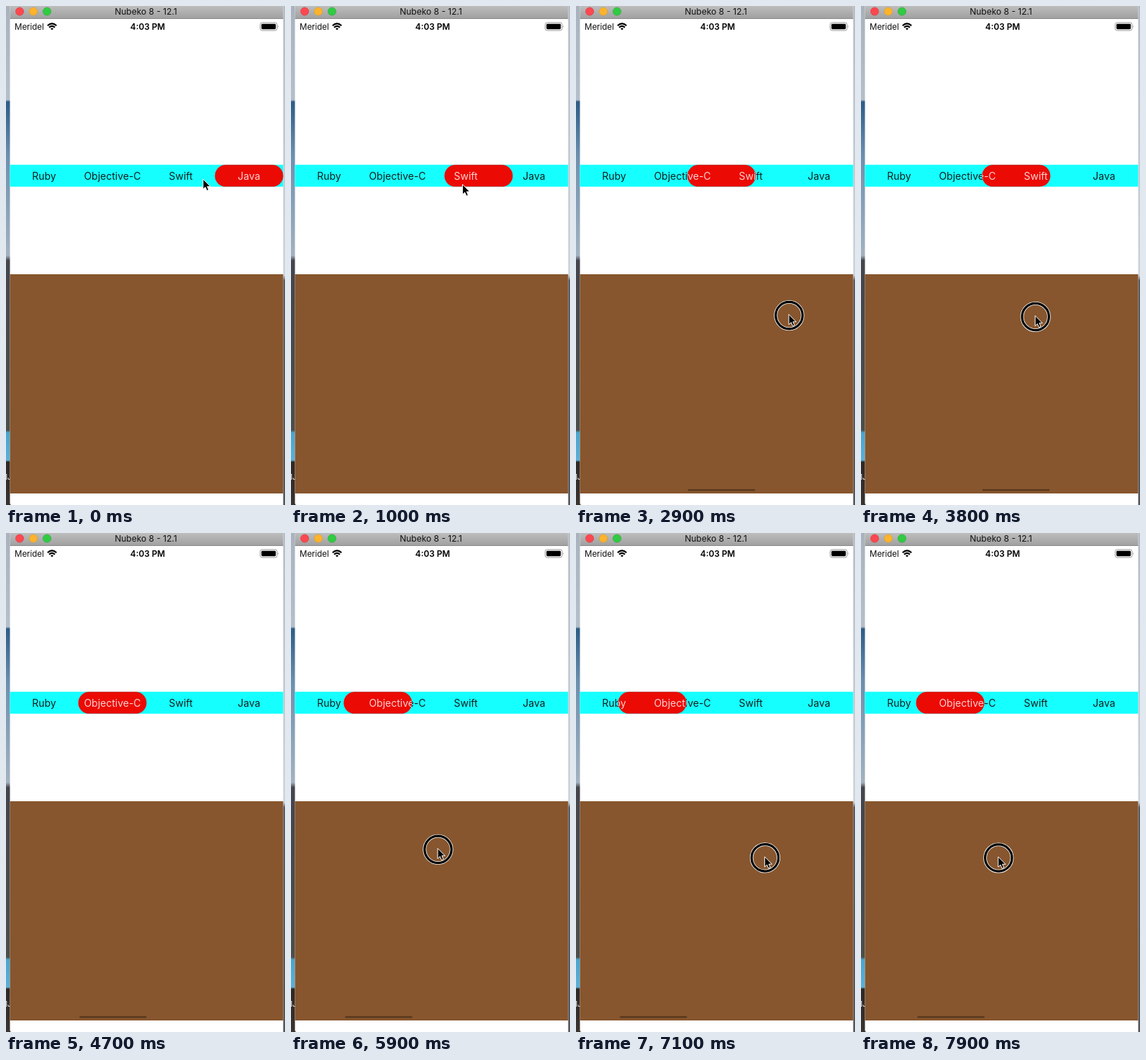
Animation of 388 by 692 pixels, one loop 8000 ms. Source, as an HTML page:

```html
<!DOCTYPE html>
<html lang="en">
<head>
<meta charset="utf-8">
<title>Segment pager</title>
<style>
  html, body { margin: 0; width: 100%; height: 100%; overflow: hidden; background: #fff; }
  svg { display: block; width: 388px; height: 692px; }
  text { font-family: Inter, Roboto, sans-serif; }
  .tabs { font-size: 14px; text-anchor: middle; }
</style>
</head>
<body>
<svg viewBox="0 0 388 692">
  <defs>
    <linearGradient id="desk" x1="0" y1="0" x2="0" y2="1">
      <stop offset="0" stop-color="#a9b2bd"/>
      <stop offset=".188" stop-color="#b4bfca"/>
      <stop offset=".192" stop-color="#2d5c85"/>
      <stop offset=".3" stop-color="#6d90ae"/>
      <stop offset=".5" stop-color="#a3b2c0"/>
      <stop offset=".51" stop-color="#45454d"/>
      <stop offset=".85" stop-color="#4c4f4b"/>
      <stop offset=".855" stop-color="#4aa5cf"/>
      <stop offset=".91" stop-color="#5bb0d8"/>
      <stop offset=".914" stop-color="#2d2927"/>
      <stop offset="1" stop-color="#3a3330"/>
    </linearGradient>
    <linearGradient id="edge" x1="0" y1="0" x2="0" y2="1">
      <stop offset="0" stop-color="#b5bcc5"/>
      <stop offset=".54" stop-color="#ccd3da"/>
      <stop offset=".55" stop-color="#5a5a62"/>
      <stop offset="1" stop-color="#55565a"/>
    </linearGradient>
    <linearGradient id="bar" x1="0" y1="0" x2="0" y2="1">
      <stop offset="0" stop-color="#bdbdbd"/>
      <stop offset="1" stop-color="#a0a0a0"/>
    </linearGradient>
    <clipPath id="clip"><rect id="hole" y="220.2" width="95" height="30.4" rx="15.2"/></clipPath>
  </defs>

  <rect width="388" height="692" fill="url(#edge)"/>
  <rect width="6" height="692" fill="url(#desk)"/>
  <text x="-2" y="657" font-size="10" fill="#eee">1J</text>
  <path d="M5.5 0H385.5V692H8Q5.5 692 5.5 689Z" fill="#fff"/>

  <rect x="5.5" width="380" height="17.5" fill="url(#bar)"/>
  <rect x="5.5" y="17" width="380" height="1" fill="#8c8c8c"/>
  <g stroke-width=".6">
    <circle cx="19" cy="7.5" r="5.6" fill="#fc4850" stroke="#d93a3e"/>
    <circle cx="38" cy="7.5" r="5.6" fill="#fdb32c" stroke="#d99a28"/>
    <circle cx="57" cy="7.5" r="5.6" fill="#30cb43" stroke="#27a935"/>
  </g>
  <text x="194.5" y="12" font-size="12" text-anchor="middle" fill="#111">Nubeko 8 - 12.1</text>

  <text x="12" y="33" font-size="11.5" fill="#111">Meridel</text>
  <g fill="none" stroke="#000" stroke-width="2.1">
    <path d="M57.8 27.3Q64 21.4 70.2 27.3M60 29.8Q64 26 68 29.8"/>
    <path d="M62 31.2Q64 29.6 66 31.2L64 33.4Z" fill="#000" stroke="none"/>
  </g>
  <text x="197" y="32.7" font-size="11.8" font-weight="600" text-anchor="middle">4:03 PM</text>
  <rect x="353.5" y="23" width="23.5" height="11" rx="2.8" fill="none" stroke="#999"/>
  <rect x="355.2" y="24.8" width="20" height="7.4" rx="1.4"/>
  <path d="M378.2 26.7q1.8 1.8 0 3.6z" fill="#999"/>

  <rect x="5.5" y="220.2" width="380" height="30.4" fill="#16ffff"/>
  <g class="tabs" id="tabs" fill="#10201f"></g>
  <g clip-path="url(#clip)">
    <rect x="5" y="220" width="381" height="31" fill="#ec0a04"/>
    <g class="tabs" id="lit" fill="#fbd0d0"></g>
  </g>

  <rect x="5.5" y="372" width="380" height="304" fill="#87562e"/>
  <rect id="thumb" y="670" width="93.5" height="2.6" rx="1.3" fill="#5b391d"/>

  <g id="mouse">
    <g id="ring" fill="none">
      <circle cx=".5" cy="1.5" r="18.7" stroke="#fff" stroke-width="4.8"/>
      <circle cx=".5" cy="1.5" r="18.7" stroke="#000" stroke-width="3.2"/>
    </g>
    <path d="M0 0V14.2L3.2 11.2L5.4 16.2L7.9 15.1L5.8 10.3H10.2Z" stroke="#fff"/>
  </g>
</svg>
<script>
const LOOP = 8000, STEP = 100, PAGE = 380;
const TAP = 700, GRAB = 1650, DROP = 4300, REGRAB = 5200;
const $ = id => document.getElementById(id);

const labels = ['Ruby', 'Objective-C', 'Swift', 'Java']
  .map((s, i) => `<text x="${53 + 95 * i}" y="241">${s}</text>`).join('');
$('tabs').innerHTML = $('lit').innerHTML = labels;

const unit = u => Math.min(1, Math.max(0, u));
const ease = (t, from, to) => (1 - Math.cos(Math.PI * unit((t - from) / (to - from)))) / 2;
const mix = (a, b, u) => a + (b - a) * u;

// Swings between turning points that are evenly spaced in time
function swing(t, start, half, turns) {
  const n = Math.max(0, (t - start) / half), i = Math.min(turns.length - 2, Math.floor(n));
  return mix(turns[i], turns[i + 1], ease(n, i, i + 1));
}
const firstDrag = t => swing(t, GRAB, 879, [133.5, 395, 133.5, 395]);
const secondDrag = t => swing(t, REGRAB, 350, [95, 354, 204, 354, 200, 302, 200, 302, 165]);

function pointer(t) {
  if (t < GRAB) {
    const aim = ease(t, 0, 400), go = ease(t, 900, 1600);
    return [mix(274 - 30 * aim, 133.5, go), mix(240 - 2 * aim, 425, go)];
  }
  if (t < DROP) return [firstDrag(t), 425 + (t - GRAB) / 480];
  if (t < REGRAB) return [mix(400, 95, ease(t, 4800, REGRAB)), 433];
  return [secondDrag(t), mix(433, 449, ease(t, REGRAB, 7200))];
}

function pageAt(t) {
  if (t < GRAB) return 3 - ease(t, 750, 1100);
  const first = 2 - (firstDrag(Math.min(t, DROP)) - 133.5) / PAGE;
  if (t < DROP) return first;
  if (t < REGRAB) return mix(1, first, (1 - unit((t - DROP) / 400)) ** 3);
  return 1 - (secondDrag(t) - 95) / PAGE;
}

function draw(now) {
  const t = Math.floor(now % LOOP / STEP) * STEP, p = pageAt(t);
  const pressed = t === TAP || t >= 1600 && t < DROP || t >= REGRAB;
  $('hole').setAttribute('x', 5.5 + 95 * p);
  $('thumb').setAttribute('x', 8.5 + 93.5 * p);
  $('thumb').style.opacity = t > GRAB ? 1 : 0;
  $('mouse').setAttribute('transform', `translate(${pointer(t)})`);
  $('ring').style.opacity = pressed ? 1 : 0;
}

const begin = performance.now();
(function tick() {
  draw(performance.now() - begin);
  requestAnimationFrame(tick);
})();
</script>
</body>
</html>
```
